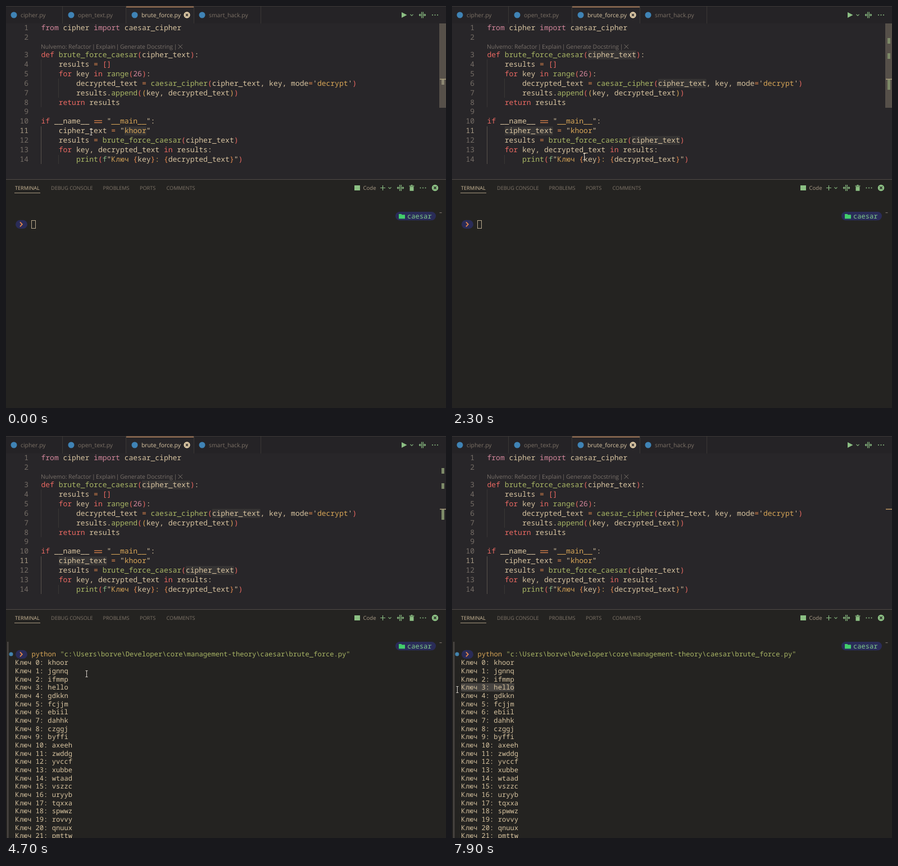
These frames come from a looping animation (783x715 px, 8000 ms). An HTML page with a canvas:

```html
<!DOCTYPE html>
<html lang="en">
<head>
<meta charset="utf-8">
<title>Brute force in the editor</title>
<style>
html, body { margin: 0; width: 100%; height: 100%; overflow: hidden; background: #242321; }
canvas { display: block; width: 783px; height: 715px; }
</style>
</head>
<body>
<canvas id="stage" width="783" height="715"></canvas>
<script>
const ctx = document.getElementById('stage').getContext('2d');
const LOOP = 8000, STEP = 100;
const MONO = '"Noto Sans Mono", "DejaVu Sans Mono", monospace';
const SANS = '"Open Sans", "Noto Sans", sans-serif';
const EDIT = { x: 62.5, w: 7.8, font: '13px ' + MONO };
const TERM = { x: 16.2, w: 7.27, font: '12.1px ' + MONO };
const INK = { w: '#d8c4a0', r: '#ea6962', p: '#d3869b', o: '#e78a4e', y: '#d8a657', g: '#a9b665', a: '#89b482' };
const GREEN = '#8cc084', NAVY = '#2a2c58', EDITOR = '#282629', PANEL = '#242321', BORDER = '#3b3836';

// A "§" is followed by the key of the ink that takes over.
const CODE = [
  '§pfrom §wcipher §pimport §wcaesar_cipher',
  '',
  '§rdef §gbrute_force_caesar§r(§wcipher_text§r)§w:',
  '    results §o= §r[]',
  '    §rfor §wkey §rin §grange§r(§p26§r)§w:',
  '        decrypted_text §o= §gcaesar_cipher§r(§wcipher_text, key, mode§o=§w\'§ydecrypt§w\'§r)',
  '        results.§gappend§r(§y(§wkey, decrypted_text§y)§r)',
  '    §rreturn §wresults',
  '',
  '§rif §w__name__    "§y__main__§w":',
  '    cipher_text §o= §w"§ykhoor§w"',
  '    results §o= §gbrute_force_caesar§r(§wcipher_text§r)',
  '    §rfor §wkey, decrypted_text §rin §wresults:',
  '        §gprint§r(§af§w"§yКлюч §o{§wkey§o}§y: §o{§wdecrypted_text§o}§w"§r)'
];
const USES = [[3, 23], [6, 39], [11, 4], [12, 33]];

const PATH = [
  [0, 151, 224], [700, 151, 224], [1400, 164, 225], [1800, 164, 224], [2300, 235, 268],
  [2800, 236, 285], [3500, 224, 448], [3700, 222, 453], [4400, 215, 440], [5000, 70, 405],
  [5500, 118, 406], [5700, 119, 418], [6300, 82, 433], [6700, 104, 434], [7000, 111, 449],
  [7200, 111, 449], [7800, 9, 451], [8000, 9, 451]
];
const PICK = 1750, COMMAND = 3100, OUTPUT = 3300, FOCUS = 4900;

const lineY = n => n < 3 ? 39 + (n - 1) * 17 : 87 + (n - 3) * 16.9;
const rowY = n => 403 + n * 14.67;
const colX = (grid, c) => grid.x + c * grid.w;

function box(x, y, w, h, color) {
  ctx.fillStyle = color;
  ctx.fillRect(x, y, w, h);
}

function pill(x, y, w, h, color) {
  ctx.fillStyle = color;
  ctx.beginPath();
  ctx.roundRect(x, y, w, h, h / 2);
  ctx.fill();
}

function disc(x, y, r, color) {
  ctx.fillStyle = color;
  ctx.beginPath();
  ctx.arc(x, y, r, 0, 7);
  ctx.fill();
}

function stroke(color, width, ...lines) {
  ctx.strokeStyle = color;
  ctx.lineWidth = width;
  ctx.beginPath();
  for (const p of lines) {
    ctx.moveTo(p[0], p[1]);
    for (let i = 2; i < p.length; i += 2) ctx.lineTo(p[i], p[i + 1]);
  }
  ctx.stroke();
}

function label(text, x, y, size, color) {
  ctx.font = size + 'px ' + SANS;
  ctx.fillStyle = color;
  ctx.fillText(text, x, y);
}

function cells(grid, text, x, y, color, weight = '') {
  ctx.font = weight + grid.font;
  let col = 0;
  ctx.fillStyle = color;
  for (let i = 0; i < text.length; i++) {
    if (text[i] === '§') ctx.fillStyle = INK[text[++i]];
    else ctx.fillText(text[i], x + grid.w * col++, y);
  }
}

function chevron(x, y) {
  stroke(GREEN, 1.1, [x - 2.5, y - 1.2, x, y + 1.3, x + 2.5, y - 1.2]);
}

function dots(x, y) {
  for (const d of [-4.5, 0, 4.5]) disc(x + d, y, 1, GREEN);
}

function splitIcon(x, y) {
  stroke(GREEN, 1.2, [x - 1.3, y - 5.5, x - 1.3, y + 5.5], [x + 1.3, y - 5.5, x + 1.3, y + 5.5],
    [x - 5.5, y, x - 1, y], [x + 1, y, x + 5.5, y],
    [x - 3.6, y - 2, x - 5.6, y, x - 3.6, y + 2], [x + 3.6, y - 2, x + 5.6, y, x + 3.6, y + 2]);
}

function closeIcon(x, y, color, back) {
  disc(x, y, 5.7, color);
  stroke(back, 1.3, [x - 2.2, y - 2.2, x + 2.2, y + 2.2], [x + 2.2, y - 2.2, x - 2.2, y + 2.2]);
}

function drawTabs() {
  box(0, 0, 783, 31, '#252326');
  box(213, 0, 121, 31, EDITOR);
  for (const x of [100, 213, 334, 453]) box(x, 1, 1, 30, BORDER);
  box(0, 0, 783, 1, BORDER);
  box(214, 1, 120, 1.4, '#c08a62');
  const tabs = [['cipher.py', 14, 26], ['open_text.py', 116, 128], ['brute_force.py', 229, 241], ['smart_hack.py', 349, 361]];
  tabs.forEach(([name, icon, x], i) => {
    disc(icon, 16, 5.5, '#3f83b5');
    label(name, x, 20, 10.4, i === 2 ? '#dcc8a4' : '#7c7166');
  });
  closeIcon(322, 16, '#dcc8a4', EDITOR);
  ctx.fillStyle = GREEN;
  ctx.beginPath();
  ctx.moveTo(704, 11);
  ctx.lineTo(713.5, 16);
  ctx.lineTo(704, 21);
  ctx.fill();
  chevron(722, 16);
  splitIcon(741, 16);
  dots(763.5, 16);
}

function drawLens() {
  const parts = [['Nulvemo:', 62], ['Refactor', 111], ['|', 153], ['Explain', 160], ['|', 195.5],
    ['Generate Docstring', 203], ['|', 298.5]];
  for (const [text, x] of parts) label(text, x, 76, 10.4, '#79716a');
  stroke('#79716a', 1, [306.5, 68.5, 314, 76], [314, 68.5, 306.5, 76]);
}

function drawEditor(t) {
  box(0, 31, 783, 277, EDITOR);
  const picked = t >= PICK, focused = t < FOCUS;
  if (focused) {
    const marks = picked ? USES.map(u => [...u, 11]) : [[11, 19, 5]];
    for (const [line, col, len] of marks) {
      box(colX(EDIT, col), lineY(line) - 8, len * EDIT.w, 16, '#363434');
    }
  }
  box(62, 95, 1, 85, '#3a3736');
  box(62, 214, 1, 67, '#5a534d');
  box(93, 129, 1, 34, '#3a3736');
  box(93, 265, 1, 16, '#3a3736');

  CODE.forEach((text, i) => {
    const n = i + 1, y = Math.round(lineY(n) + 4), num = String(n);
    cells(EDIT, num, 40 - num.length * EDIT.w, y, n === 11 ? '#a99b86' : '#756d66');
    cells(EDIT, text, EDIT.x, y, INK.w);
  });
  box(157, lineY(10) - 2, 14, 1.2, INK.o);
  box(157, lineY(10) + 1.6, 14, 1.2, INK.o);
  drawLens();

  const since = picked ? t - PICK : t - 350;
  if (focused && Math.floor(since / 500) % 2 === 0) {
    const x = colX(EDIT, picked ? 9 : 22), y = lineY(11);
    box(x, y - 8, EDIT.w, 16.5, '#d8c4a0');
    cells(EDIT, picked ? 'x' : 'o', x, Math.round(y + 4), EDITOR);
  }
  drawRuler(t, picked, focused);
}

function drawRuler(t, picked, focused) {
  ctx.globalAlpha = Math.max(0, Math.min(1, 1 - (t - 3500) / 800));
  box(771, 31, 12, 150, '#565049');
  ctx.globalAlpha = 1;
  if (focused && picked) {
    for (const [y, h] of [[57, 10], [84, 10], [130, 19]]) box(775, y, 5, h, '#7d8a68');
  } else if (focused) {
    box(775, 130, 5, 10, '#8b8672');
  }
  box(772, 129.5, 11, 1.5, focused ? '#a99d7d' : '#bd9560');
}

function drawPanel() {
  box(0, 308, 783, 407, PANEL);
  box(0, 308, 783, 1, '#514b47');
  const tabs = [['TERMINAL', 16], ['DEBUG CONSOLE', 80], ['PROBLEMS', 172.5], ['PORTS', 238], ['COMMENTS', 285.5]];
  tabs.forEach(([name, x], i) => label(name, x, 326.5, 9.1, i ? '#80766a' : '#d0bd9b'));
  box(15, 332, 46, 1, '#a7977f');
  box(620, 319, 10, 9, GREEN);
  label('Code', 635.5, 327, 9.6, '#a99c87');
  stroke(GREEN, 1.2, [666, 323.5, 675, 323.5], [670.5, 319, 670.5, 328]);
  chevron(683, 323.5);
  splitIcon(702, 323.5);
  box(717.5, 319.5, 9, 1.3, GREEN);
  box(720.5, 318, 3, 1.5, GREEN);
  box(718.5, 321.3, 7, 7.5, GREEN);
  dots(742, 323.5);
  closeIcon(763.5, 323.5, GREEN, PANEL);
}

function selection(t, x) {
  const reach = from => Math.round((x - TERM.x) / TERM.w) - from;
  if (t >= 5000 && t < 6300) return [0, 7, t < 5500 ? Math.max(0, reach(7)) : 7];
  if (t >= 6300 && t < 7200) return [2, 9, t < 6700 ? Math.max(0, Math.min(3, reach(9))) : 3];
  if (t >= 7200) {
    const start = Math.max(0, Math.min(13, reach(0)));
    return [3, start, 13 - start];
  }
  return null;
}

function shift(word, key) {
  return [...word].map(c => String.fromCharCode((c.charCodeAt(0) - 97 - key + 26) % 26 + 97)).join('');
}

function drawTerminal(t, x) {
  pill(693, 366, 72, 15.2, NAVY);
  box(699, 370, 5, 3, '#43cf6c');
  box(699, 371.3, 11, 7, '#43cf6c');
  cells(TERM, 'caesar', 714, 378, '#7fc98b', '500 ');
  box(771.5, 367, 4, 1.2, '#777069');
  pill(17, 380.7, 21, 15.3, NAVY);
  stroke('#e78a4e', 1.8, [25, 384.3, 28.8, 388.3, 25, 392.3]);

  if (t < COMMAND) {
    ctx.strokeStyle = '#b9aa8e';
    ctx.lineWidth = 1;
    ctx.strokeRect(45.5, 381.5, 7, 14);
    return;
  }
  box(2, 366, 2.5, 349, '#4b4743');
  disc(9, 388, 3.5, '#4383ad');
  cells(TERM, '§ypython §g"c:\\Users\\borve\\Developer\\core\\management-theory\\caesar\\brute_force.py"', 45.5, 392.3, INK.w);
  if (t < OUTPUT) return;

  const sel = selection(t, x);
  if (sel) box(colX(TERM, sel[1]), rowY(sel[0]) - 7.3, sel[2] * TERM.w, 14.7, '#474441');
  for (let key = 0; key < 22; key++) {
    cells(TERM, `Ключ ${key}: ${shift('khoor', key)}`, TERM.x, rowY(key) + 4.2, INK.w);
  }
}

function pointerAt(t) {
  const i = PATH.findIndex(p => p[0] > t);
  const [t0, x0, y0] = PATH[i - 1], [t1, x1, y1] = PATH[i];
  const k = (t - t0) / (t1 - t0), e = k * k * (3 - 2 * k);
  return [x0 + (x1 - x0) * e, y0 + (y1 - y0) * e];
}

function drawPointer(x, y) {
  x = Math.round(x) + 0.5;
  y = Math.round(y);
  stroke('#d2cdc5', 1, [x, y - 5, x, y + 5], [x - 2, y - 5.5, x + 2, y - 5.5], [x - 2, y + 5.5, x + 2, y + 5.5]);
}

function frame(now) {
  const t = Math.floor(now % LOOP / STEP) * STEP;
  const [x, y] = pointerAt(t);
  ctx.textRendering = 'geometricPrecision';
  drawEditor(t);
  drawTabs();
  drawPanel();
  drawTerminal(t, x);
  drawPointer(x, y);
}

const begin = performance.now();
function tick() {
  frame(performance.now() - begin);
  requestAnimationFrame(tick);
}
tick();
</script>
</body>
</html>
```
